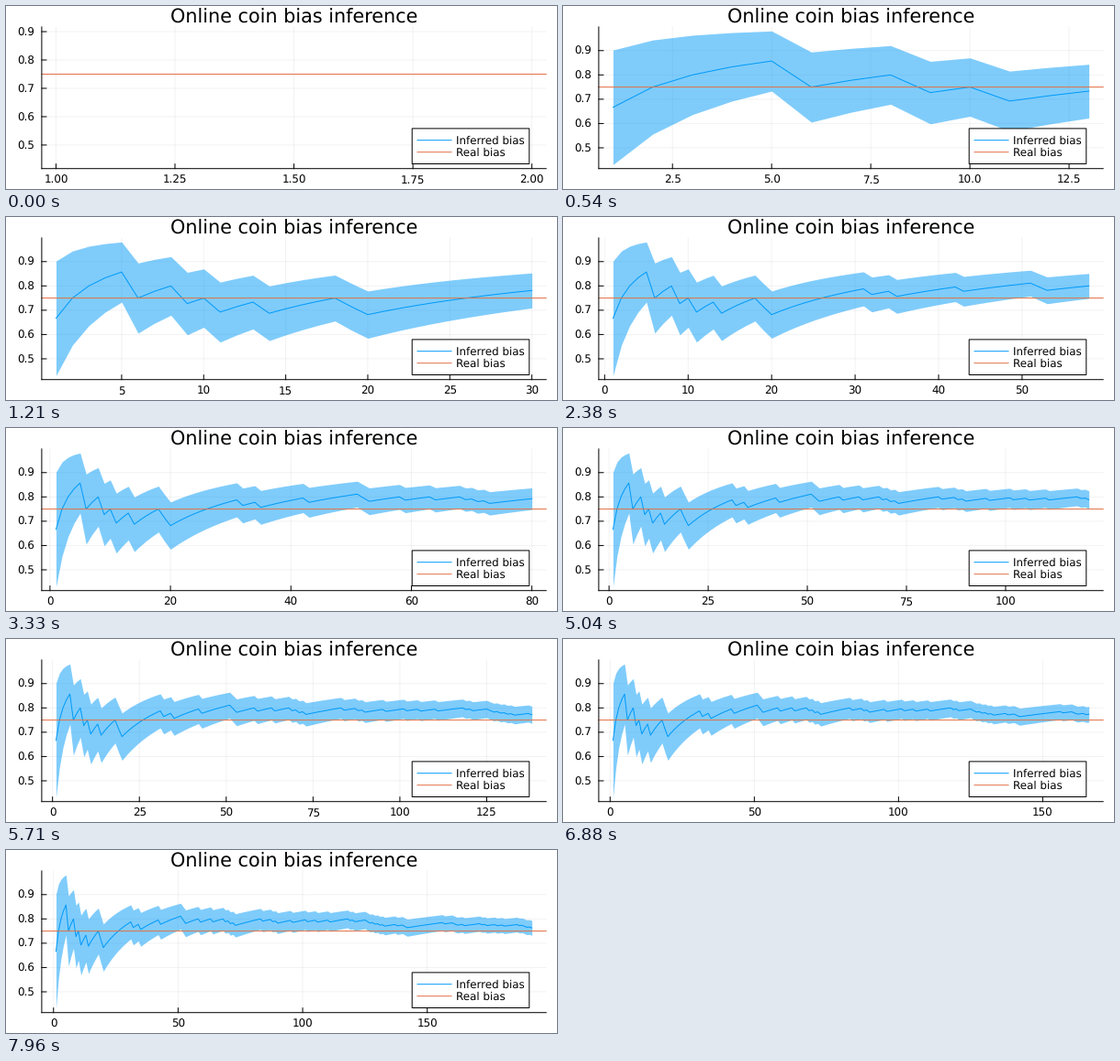
A matplotlib script that plays this animation: 600 px wide and 200 px high, repeating every 8000 ms.

```python
import math

import matplotlib.pyplot as plt
import numpy as np
from matplotlib.animation import FuncAnimation
from matplotlib.patches import Rectangle

W, H, DPI = 600, 200, 100
FRAMES, LOOP_MS = 192, 8000
LEFT, RIGHT, TOP, BOTTOM = 38.9, 588.2, 22.9, 177.7
BLUE, ORANGE = "#009AF9", "#E26F46"
REAL_BIAS = 0.75
PX = 72 / DPI

plt.rcParams["text.hinting"] = "none"

# Tosses that came up tails; every other toss is heads.
TAILS = [6, 9, 11, 14, 19, 20, 32, 35, 43, 52, 53, 59, 64, 69, 71, 73,
         84, 88, 90, 96, 102, 106, 111, 119, 121, 126, 127, 129, 131, 133,
         138, 141, 142, 157, 161, 162, 165, 172, 174, 178, 181, 187, 189,
         190, 192]

# Beta posterior after each toss, starting from a uniform prior
toss = np.arange(1, FRAMES + 1)
heads = np.cumsum(~np.isin(toss, TAILS))
a, b = heads + 1, toss - heads + 1
mean = a / (a + b)
std = np.sqrt(a * b / ((a + b) ** 2 * (a + b + 1)))
low, high = mean - std, mean + std


def widen(lo, hi):
    pad = 0.03 * (hi - lo)
    return lo - pad, hi + pad


def find_ticks(lo, hi):
    """Pick the tick step with the best mix of count, coverage and niceness."""
    span = hi - lo
    niceness = {1: 1.0, 5: 0.9, 2.5: 0.5, 2: 0.7, 3: 0.2}
    top = math.ceil(math.log10(span))
    best, best_score = [], -1
    for z in range(top, top - 3, -1):
        for q, nice in niceness.items():
            step = q * 10.0 ** z
            first, last = math.ceil(lo / step), math.floor(hi / step)
            count = last - first + 1
            if not 4 <= count <= 8:
                continue
            grain = 1 - abs(count - 5) / 5
            zero = first <= 0 <= last
            cover = 1.5 * span / ((count - 1) * step)
            score = grain / 4 + zero / 6 + cover / 3 + nice / 4
            if score > best_score + 1e-9:
                best = [round(i * step, 6) for i in range(first, last + 1)]
                best_score = score
    return best


def labels(ticks):
    for digits in range(4):
        if all(abs(round(t, digits) - t) < 1e-6 for t in ticks):
            break
    return [f"{t:.{digits}f}" for t in ticks]


fig = plt.figure(figsize=(W / DPI, H / DPI), dpi=DPI, facecolor="white")
ax = fig.add_axes([0, 0, 1, 1])
ax.set_xlim(0, W)
ax.set_ylim(H, 0)
ax.axis("off")


def line(xs, ys, color="black", **kw):
    return ax.plot(xs, ys, color=color, lw=PX, snap=False, **kw)[0]


def text(x, y, s, size=11.9, ha="left", **kw):
    return ax.text(x, y, s, fontsize=size * PX, ha=ha, va="baseline",
                   family="DejaVu Sans", color="black", **kw)


text((LEFT + RIGHT) / 2, 18.8, "Online coin bias inference", 20.8, "center")
line([LEFT, RIGHT], [BOTTOM, BOTTOM], zorder=5)
line([LEFT, LEFT], [TOP, BOTTOM], zorder=5)

ax.add_patch(Rectangle((442.2, 133.9), 127.6, 38.6, fc="white", ec="black",
                       lw=PX, snap=False, zorder=6))
for y, color, name in [(146.7, BLUE, "Inferred bias"),
                       (159.7, ORANGE, "Real bias")]:
    line([448, 485], [y, y], color, zorder=7)
    text(490, y + 4.4, name, zorder=7)

moving = []


def draw(frame):
    while moving:
        moving.pop().remove()
    n = frame + 1
    x0, x1 = widen(1, max(n, 2))
    y0, y1 = widen(low[:n].min(), high[:n].max())

    def px(x):
        return LEFT + (x - x0) / (x1 - x0) * (RIGHT - LEFT)

    def py(y):
        return BOTTOM - (y - y0) / (y1 - y0) * (BOTTOM - TOP)

    grid = dict(color="black", alpha=0.05, zorder=1)
    ticks = find_ticks(x0, x1)
    for t, s in zip(ticks, labels(ticks)):
        x = px(t)
        moving.append(line([x, x], [TOP, BOTTOM], **grid))
        moving.append(line([x, x], [BOTTOM - 5, BOTTOM], zorder=5))
        moving.append(text(x, 193.4, s, ha="center"))
    ticks = find_ticks(y0, y1)
    for t, s in zip(ticks, labels(ticks)):
        y = py(t)
        moving.append(line([LEFT, RIGHT], [y, y], **grid))
        moving.append(line([LEFT, LEFT + 5], [y, y], zorder=5))
        moving.append(text(31.3, y + 4.4, s, ha="right"))

    if n > 1:
        xs = px(toss[:n])
        moving.append(ax.fill_between(xs, py(low[:n]), py(high[:n]), color=BLUE,
                                      alpha=0.5, lw=0, zorder=2))
        moving.append(line(xs, py(mean[:n]), BLUE, zorder=3))
    y = py(REAL_BIAS)
    moving.append(line([LEFT, RIGHT], [y, y], ORANGE, zorder=4))
    return moving


anim = FuncAnimation(fig, draw, frames=FRAMES, interval=LOOP_MS / FRAMES,
                     init_func=lambda: draw(0), repeat=True, repeat_delay=0,
                     blit=False)
plt.show()
```
